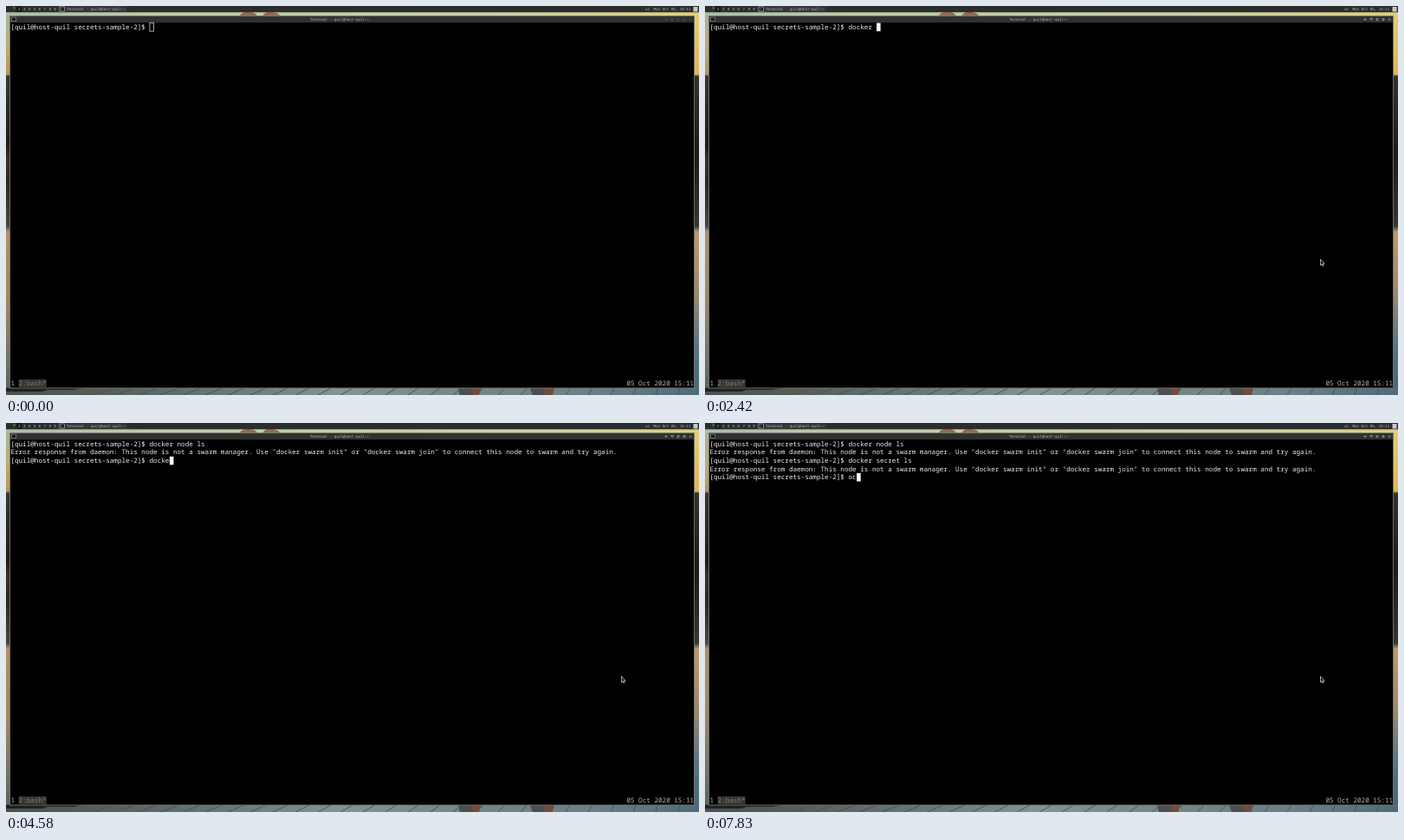
Recreate the animation shown at these times as an HTML page. Size 800 by 450 pixels, loop 8000 ms.

```html
<!DOCTYPE html>
<html lang="en">
<head>
<meta charset="utf-8">
<title>Terminal session</title>
<style>
  html, body { margin: 0; width: 100%; height: 100%; overflow: hidden; background: #000; }
  svg { display: block; width: 100%; height: 100%; }
  text { white-space: pre; text-rendering: geometricPrecision; }
  .term { font: 7.645px "Noto Sans Mono", "DejaVu Sans Mono", monospace; fill: #ececec; }
  .small { font: 4.2px "DejaVu Sans Mono", monospace; fill: #b8b8b8; }
</style>
</head>
<body>
<svg viewBox="0 0 800 450" preserveAspectRatio="none">
  <defs>
    <linearGradient id="sky">
      <stop offset="0" stop-color="#a9bfa6"/>
      <stop offset=".2" stop-color="#bccbaa"/>
      <stop offset=".75" stop-color="#cbd3a4"/>
      <stop offset="1" stop-color="#dfcf80"/>
    </linearGradient>
    <linearGradient id="left" x2="0" y2="1">
      <stop offset="0" stop-color="#a9b493"/>
      <stop offset=".08" stop-color="#c0ac78"/>
      <stop offset=".155" stop-color="#b89558"/>
      <stop offset=".16" stop-color="#3a3833"/>
      <stop offset=".34" stop-color="#1f1b18"/>
      <stop offset=".38" stop-color="#3d3222"/>
      <stop offset=".44" stop-color="#2b2823"/>
      <stop offset=".555" stop-color="#4a463f"/>
      <stop offset=".57" stop-color="#b39264"/>
      <stop offset=".75" stop-color="#a28862"/>
      <stop offset=".9" stop-color="#74756a"/>
      <stop offset="1" stop-color="#555f5c"/>
    </linearGradient>
    <linearGradient id="right" x2="0" y2="1">
      <stop offset="0" stop-color="#e4cd74"/>
      <stop offset=".155" stop-color="#e0b754"/>
      <stop offset=".16" stop-color="#34332f"/>
      <stop offset=".36" stop-color="#1b1a18"/>
      <stop offset=".555" stop-color="#383631"/>
      <stop offset=".57" stop-color="#bb9b68"/>
      <stop offset=".72" stop-color="#a18b6a"/>
      <stop offset=".87" stop-color="#587584"/>
      <stop offset="1" stop-color="#466475"/>
    </linearGradient>
    <linearGradient id="planks">
      <stop offset="0" stop-color="#4b514c"/>
      <stop offset=".12" stop-color="#535c57"/>
      <stop offset=".35" stop-color="#6d7d78"/>
      <stop offset=".48" stop-color="#84958f"/>
      <stop offset=".62" stop-color="#778887"/>
      <stop offset=".85" stop-color="#687f86"/>
      <stop offset="1" stop-color="#4f6b7a"/>
    </linearGradient>
  </defs>

  <!-- wallpaper -->
  <rect y="7" width="800" height="6" fill="url(#sky)"/>
  <path d="M269 12q4-6 12-5 7 0 9 5zM296 12q3-6 10-5 8 0 11 5z" fill="#926b50"/>
  <rect y="11" width="5" height="439" fill="url(#left)"/>
  <rect x="794" y="11" width="6" height="439" fill="url(#right)"/>
  <rect y="441" width="800" height="9" fill="url(#planks)"/>
  <path id="seams" stroke="#45534f" stroke-width=".9" fill="none"/>
  <path d="M0 442h90l-12 2H48l-6 2H0z" fill="#1d211f"/>
  <path d="M522 442h15l3 8h-16zM605 442h16l2 8h-15z" fill="#4c4f4b"/>
  <path d="M537 442h12l-3 8h-7zM621 442h12l-2 8h-8z" fill="#754b3c"/>

  <!-- panel -->
  <rect width="800" height="7.3" fill="#2b2d2d"/>
  <rect x="12" width="6" height="7" fill="#171919"/>
  <rect x="60" width="80" height="7" fill="#343636"/>
  <g id="desks" class="small"></g>
  <path d="M8.5 1l2 1.3-2 1.3" fill="none" stroke="#bbb" stroke-width=".6"/>
  <rect x="62" y="1" width="5.5" height="5" fill="#191919" stroke="#aaa" stroke-width=".7"/>
  <path d="M63.4 2.4l1.2 1-1.2 1" fill="none" stroke="#ccc" stroke-width=".5"/>
  <text class="small title" x="70" y="5"></text>
  <text class="small" x="738" y="5">us</text>
  <text class="small" x="747.5" y="5">Mon Oct 05, 15:11</text>
  <rect x="793.5" y="1" width="5" height="5.5" fill="#c9c9c9"/>

  <!-- window -->
  <rect x="4.5" y="11.5" width="790" height="430.5" fill="#000" stroke="#777a78" stroke-width=".9"/>
  <rect x="5" y="12" width="789" height="7.2" fill="#303232"/>
  <rect x="6.5" y="13.1" width="5" height="4.6" fill="#161616" stroke="#9a9a9a" stroke-width=".6"/>
  <text class="small title" x="385" y="17.1" text-anchor="middle"></text>
  <path id="buttons" fill="none" stroke="#aaa" stroke-width=".7"
    d="M760.5 15.6h3M762 14.1v3M767.8 14.5h2.8l-1.4 2zM775 14.6h2v2h-2zM782 14.6h2v2h-2zM789 14.5l2.2 2.2m0-2.2L789 16.7"/>
  <rect x="14.6" y="431.9" width="32.1" height="9.4" fill="#363636"/>
  <g class="term" id="status"></g>
  <g id="rows" class="term"></g>
  <rect id="cursor" width="4.6" height="9.6"/>
  <path id="pointer" d="M710.5 293v7l1.6-1.4 1 2.2 1-.5-1-2.1h2z" fill="#111" stroke="#e4e4e4" stroke-width=".7"/>
</svg>
<script>
const LOOP = 8000, LEFT = 5.4, TOP = 19.6, COL = 4.587, ROW = 9.583;
const FOCUS = 1170, POINTER = 170;
const USER = 'quil@host-quil';
const PROMPT = `[${USER} secrets-sample-2]$ `;
const ERROR = 'Error response from daemon: This node is not a swarm manager. ' +
  'Use "docker swarm init" or "docker swarm join" to connect this node to swarm and try again.';

// [time, keys]: '\b' deletes, '\n' opens a row, '!' prints the error, '$' prints a prompt
const KEYS = [
  [1170, 'd'], [1250, 'o'], [1330, 'c'], [1420, 'k'], [1580, 'e'], [1830, 'r'], [1920, ' '],
  [2330, '\b'], [2420, ' '], [2750, 'n'], [3000, 'o'], [3080, 'd'], [3330, 'e'], [3420, ' '],
  [3580, 'l'], [3670, 's'], [3830, '\n'], [3920, '!\n$'],
  [4250, 'do'], [4330, 'c'], [4420, 'k'], [4580, 'e'], [4830, 'r'], [4920, ' '],
  [5250, 's'], [5330, 'e'], [5500, 'c'], [5750, 'r'], [5920, 'e'], [6170, 't'], [6250, ' '],
  [6420, 'l'], [6500, 's'], [6750, '\n'], [6830, '!\n'], [6920, '$'],
  [7750, 'o'], [7830, 'c']
];

const $ = id => document.getElementById(id);
const baseline = row => TOP + row * ROW + 7.3;
const column = col => LEFT + col * COL;

function addText(parent, x, y, content = '', fill = '') {
  const node = document.createElementNS('http://www.w3.org/2000/svg', 'text');
  node.setAttribute('x', x);
  node.setAttribute('y', y);
  node.style.fill = fill;
  node.textContent = content;
  return parent.appendChild(node);
}

document.querySelectorAll('.title').forEach(node => node.textContent = `Terminal - ${USER}:~`);
for (let n = 2; n <= 9; n++) addText($('desks'), 14 + (n - 2) * 5.9, 5, n);
addText($('status'), column(0), baseline(43), '1', '#b5b5b5');
addText($('status'), column(2), baseline(43), '2:bash*', '#7c7c7c');
addText($('status'), column(155), baseline(43), '05 Oct 2020 15:11', '#b5b5b5');
const rows = Array.from({ length: 5 }, (_, i) => addText($('rows'), column(0), baseline(i)));

let seams = '';
for (let x = 100; x < 800; x += 26) seams += `M${x} 450l${(400 - x) / 30 + 14} -8`;
$('seams').setAttribute('d', seams);

function screenAt(time) {
  const lines = [PROMPT];
  for (const [at, keys] of KEYS) {
    if (at > time) break;
    for (const key of keys) {
      const last = lines.length - 1;
      if (key === '\n') lines.push('');
      else if (key === '\b') lines[last] = lines[last].slice(0, -1);
      else if (key === '!') lines[last] = ERROR;
      else if (key === '$') lines[last] = PROMPT;
      else lines[last] += key;
    }
  }
  return lines;
}

function setCursor(lines, focused) {
  const last = lines.length - 1;
  const look = {
    x: column(lines[last].length),
    y: TOP + last * ROW,
    fill: focused ? '#f8f8f8' : 'none',
    stroke: focused ? 'none' : '#d0d0d0',
    'stroke-width': .8
  };
  for (const name in look) $('cursor').setAttribute(name, look[name]);
}

const start = performance.now();
function draw() {
  const time = (performance.now() - start) % LOOP;
  const lines = screenAt(time);
  rows.forEach((node, i) => {
    const line = lines[i] || '';
    if (node.textContent !== line) node.textContent = line;
  });
  setCursor(lines, time >= FOCUS);
  $('pointer').style.opacity = time < POINTER ? 0 : 1;
  $('buttons').style.opacity = time < POINTER ? .25 : 1;
  requestAnimationFrame(draw);
}
draw();
</script>
</body>
</html>
```
